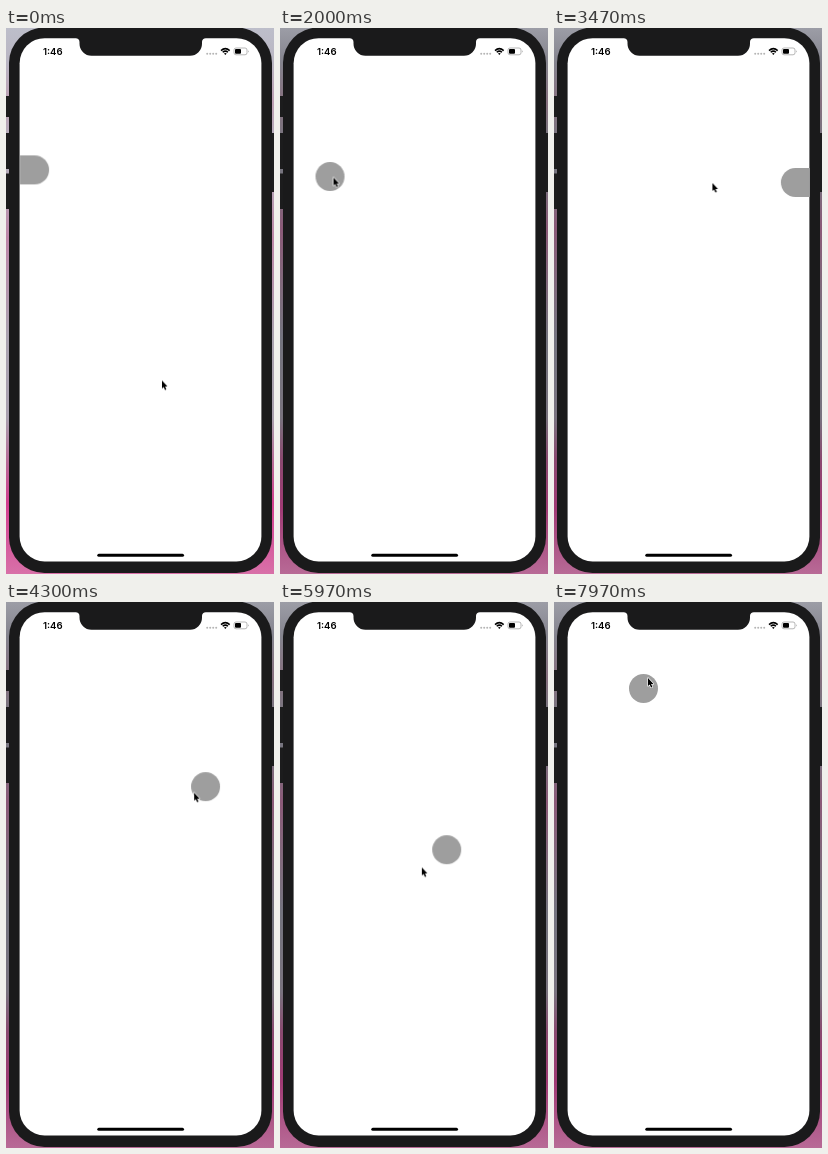
An HTML page for the animation above (8 s loop, 268 by 546 pixels).

```html
<!DOCTYPE html>
<html lang="en">
<head>
<meta charset="utf-8">
<title>Floating button</title>
<style>
html, body { margin: 0; width: 100%; height: 100%; overflow: hidden; }
body { position: relative; background: #77747f; }
.layer, svg.phone { position: absolute; left: 0; top: 0; width: 268px; height: 546px; }
.wall {
  background: linear-gradient(#9c9da6 0, #84838d 35px, #86707f 75px, #77767f 115px, #77747f 150px,
    #8b5a78 200px, #806a7c 260px, #74747f 310px, #79737f 390px, #8a4a70 430px, #a03a74 480px, #b86a96 546px);
}
.bright {
  background: linear-gradient(#bdbeca 0, #b9b5c2 35px, #bd9fb4 75px, #b4b0bd 115px, #b4a8b8 150px,
    #bd86a8 210px, #aaa3b0 310px, #a9a0ae 390px, #b86a97 435px, #d23f8f 475px, #d870a8 546px);
  animation: dim 8s linear infinite;
}
.button, .cursor { position: absolute; left: 0; top: 0; }
.button {
  width: 29px; height: 29px; margin: -14.5px 0 0 -14.5px;
  background: #9e9e9e;
  animation: drag 8s linear infinite, dock 8s linear infinite;
}
.cursor {
  width: 12px; height: 16px; margin: -1px 0 0 -1px;
  animation: point 8s ease-in-out infinite;
}

@keyframes dim {
  0%, 5.875% { opacity: 1; }
  13.375%, 100% { opacity: 0; }
}

@keyframes drag {
  0% { transform: translate(28.1px, 141.4px); }
  17.5% { transform: translate(28.1px, 141.4px); animation-timing-function: cubic-bezier(.5, .1, .8, .8); }
  25% { transform: translate(49.5px, 148px); animation-timing-function: cubic-bezier(.4, .15, .65, .85); }
  34.125% { transform: translate(132px, 152.8px); }
  34.5% { transform: translate(134px, 153.5px); animation-timing-function: cubic-bezier(.3, .25, .7, .8); }
  37.875% { transform: translate(216px, 154px); animation-timing-function: ease-out; }
  39.125% { transform: translate(240.9px, 154px); }
  50.375% { transform: translate(240.9px, 154px); animation-timing-function: cubic-bezier(.5, .1, .8, .7); }
  53.75% { transform: translate(199.4px, 184px); animation-timing-function: cubic-bezier(.3, .35, .7, 1); }
  56.5% { transform: translate(137px, 210px); animation-timing-function: cubic-bezier(.35, .2, .6, .9); }
  60.375% { transform: translate(237px, 210px); animation-timing-function: ease-out; }
  61.25% { transform: translate(240.9px, 210px); }
  71.625% { transform: translate(240.9px, 210px); animation-timing-function: cubic-bezier(.5, .05, .8, .6); }
  74.625% { transform: translate(167px, 246.8px); }
  76.25% { transform: translate(66px, 300px); animation-timing-function: cubic-bezier(.2, .5, .5, 1); }
  78.75% { transform: translate(28.1px, 323.3px); }
  93.75% { transform: translate(28.1px, 323.3px); animation-timing-function: cubic-bezier(.45, .05, .7, .8); }
  99.625%, 100% { transform: translate(89px, 86px); }
}

/* corners on the docked side are square */
@keyframes dock {
  0%, 17.5% { border-radius: 0 14.5px 14.5px 0; }
  18.5%, 37.875% { border-radius: 14.5px; }
  39.125%, 50.375% { border-radius: 14.5px 0 0 14.5px; }
  51.375%, 60.25% { border-radius: 14.5px; }
  61.25%, 71.625% { border-radius: 14.5px 0 0 14.5px; }
  72.625%, 77.75% { border-radius: 14.5px; }
  78.75%, 93.75% { border-radius: 0 14.5px 14.5px 0; }
  94.75%, 100% { border-radius: 14.5px; }
}

@keyframes point {
  0%, .375% { transform: translate(156px, 352.500px); }
  3.375%, 5.875% { transform: translate(62px, 204px); }
  13.375% { transform: translate(32px, 142px); }
  17.5% { transform: translate(32px, 142px); animation-timing-function: cubic-bezier(.5, .1, .8, .8); }
  25% { transform: translate(53.500px, 149.500px); animation-timing-function: cubic-bezier(.4, .15, .65, .85); }
  34.125% { transform: translate(135px, 154.500px); animation-timing-function: ease-out; }
  34.75%, 41.625% { transform: translate(137px, 155px); }
  47.125% { transform: translate(237px, 155px); }
  50.375% { transform: translate(237px, 155px); animation-timing-function: cubic-bezier(.5, .1, .8, .7); }
  53.75% { transform: translate(188.500px, 190.500px); animation-timing-function: cubic-bezier(.3, .35, .7, 1); }
  56.25%, 63.75% { transform: translate(131px, 216px); }
  68.375% { transform: translate(238px, 217px); }
  71.625% { transform: translate(238px, 217px); animation-timing-function: cubic-bezier(.5, .05, .8, .6); }
  74.625% { transform: translate(142.700px, 265px); animation-timing-function: linear; }
  75.875%, 80.875% { transform: translate(59px, 308px); }
  85.375%, 88.375% { transform: translate(43px, 331px); }
  91.25% { transform: translate(30.200px, 321.500px); }
  93.75% { transform: translate(30.200px, 321.500px); animation-timing-function: cubic-bezier(.45, .05, .7, .8); }
  99.625%, 100% { transform: translate(94px, 76px); }
}
</style>
</head>
<body>
<div class="layer wall"></div>
<div class="layer bright"></div>

<svg class="phone" viewBox="0 0 268 546">
  <g fill="#1c1c1d">
    <rect x="0" y="68" width="5" height="21"/>
    <rect x="0" y="105" width="5" height="36"/>
    <rect x="0" y="145.5" width="5" height="35.5"/>
    <rect x="264" y="105" width="4" height="59"/>
  </g>
  <rect x="3" y="-.5" width="263" height="545.5" rx="35.5" fill="#1a1a1b"/>
  <rect x="13.6" y="10.2" width="241.8" height="523.2" rx="25" fill="#fff"/>
  <path d="M69 10H200.500A4 4 0 0 0 196 14V15.700A12 12 0 0 1 184 27.700H85.500A12 12 0 0 1 73.500 15.700V14A4 4 0 0 0 69 10Z" fill="#1a1a1b"/>

  <text x="37" y="27" font-family="Inter, 'Liberation Sans', sans-serif" font-size="9.6" font-weight="600">1:46</text>

  <g fill="#b5b5b5">
    <circle cx="201.200" cy="25.800" r="1"/>
    <circle cx="204.200" cy="25.800" r="1"/>
    <circle cx="207.200" cy="25.800" r="1"/>
    <circle cx="210.200" cy="25.800" r="1"/>
  </g>
  <g fill="none" stroke="#000" stroke-width="1.5">
    <path d="M215 22.600Q219.300 18.600 223.700 22.600"/>
    <path d="M216.700 24.300Q219.300 22 222 24.300"/>
  </g>
  <path d="M218 25.400Q219.300 24.400 220.700 25.400L219.300 27Z"/>

  <rect x="228" y="20" width="13" height="6.800" rx="2" fill="#fff" stroke="#999" stroke-width=".7"/>
  <rect x="229" y="21" width="6" height="4.800" rx="1"/>
  <path d="M242 22.200Q243.400 23.400 242 24.600Z" fill="#999"/>

  <rect x="91.300" y="525.700" width="86.700" height="3" rx="1.500"/>
</svg>

<div class="button"></div>
<svg class="cursor" viewBox="-1 -1 12 16">
  <path d="M0 0V8L1.700 6.500L3 9.500L4.400 8.900L3.100 5.900H5.500Z" stroke="#fff" stroke-width="1.200" paint-order="stroke" stroke-linejoin="round"/>
</svg>
</body>
</html>
```
